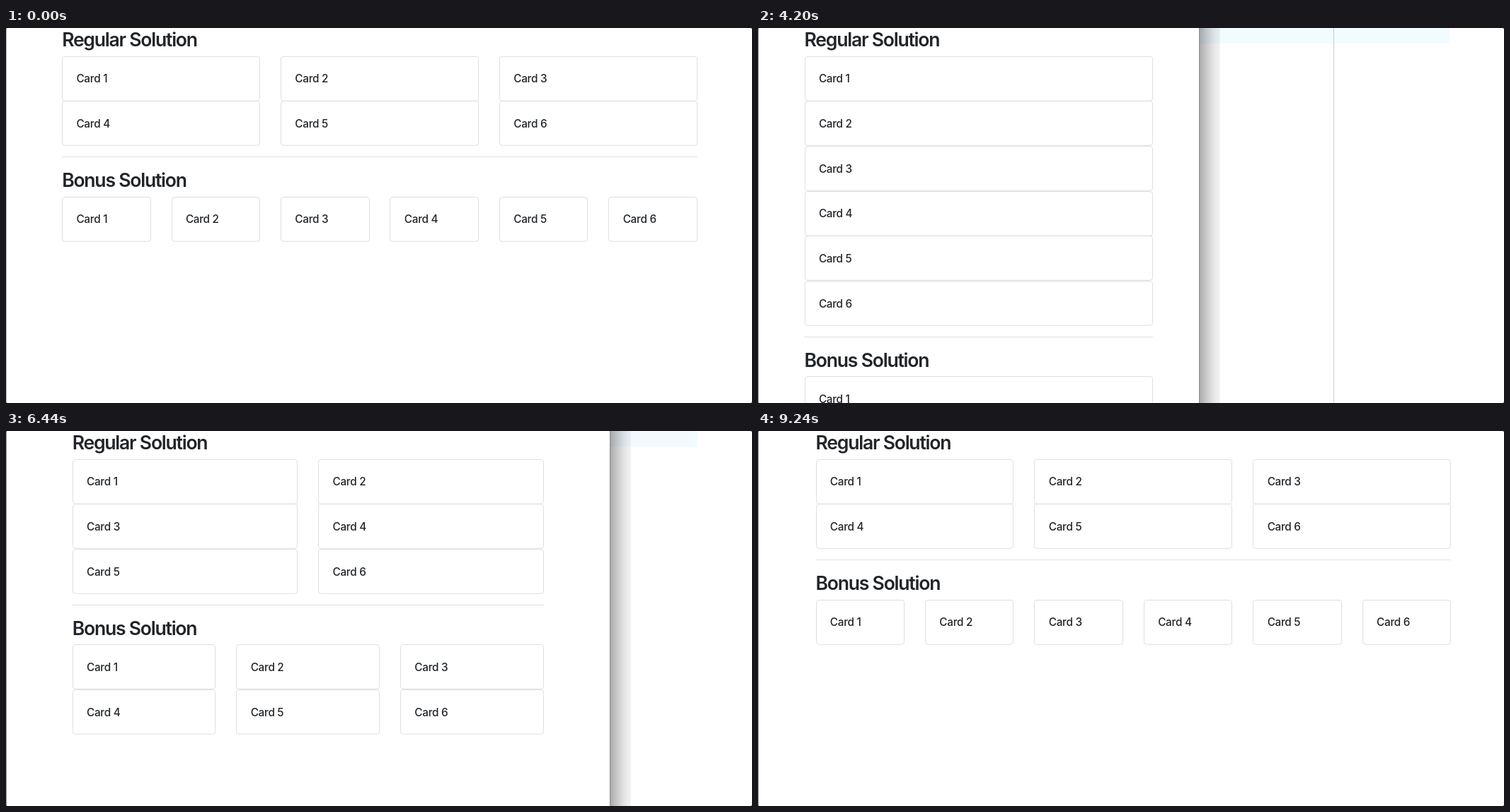
Write an HTML page that moves like this. It is 1054x531 px and loops after 9450 ms.

```html
<!DOCTYPE html>
<html lang="en">
<head>
<meta charset="utf-8">
<title>Responsive cards</title>
<style>
html, body { margin: 0; width: 100%; height: 100%; overflow: hidden; background: #fff; }
svg { display: block; width: 1054px; height: 531px; font-family: Inter, sans-serif; fill: #212529; }
.head { font-size: 26.6px; font-weight: 600; letter-spacing: -1.25px; }
.label { font-size: 15.3px; font-weight: 500; letter-spacing: -0.27px; }
.card { fill: #fff; stroke: #dfdfdf; }
</style>
</head>
<body>
<svg viewBox="0 0 1054 531">
  <defs>
    <linearGradient id="fade">
      <stop offset="0" stop-opacity=".34"/>
      <stop offset=".35" stop-opacity=".21"/>
      <stop offset=".7" stop-opacity=".1"/>
      <stop offset="1" stop-opacity=".045"/>
    </linearGradient>
  </defs>
  <rect width="1054" height="531" fill="#fff"/>
  <rect width="977" height="22" fill="#f2fbff"/>
  <rect x="813" width="1" height="531" fill="#cdcdcd"/>
  <g id="win">
    <rect width="30" height="531" fill="url(#fade)"/>
    <rect x="-1100" width="1100" height="531" fill="#fff"/>
    <rect width="1" height="531" fill="#8c8c8c"/>
  </g>
  <g id="page"></g>
  <rect id="edge" width="1" height="531"/>
  <path d="M0 0h1v1h-1zM1053 0h1v1h-1zM0 530h1v1h-1zM1053 530h1v1h-1z" fill="#444"/>
</svg>
<script>
const LOOP = 9450, STEP = 70;
const SCALE = 0.9653;             // zoom of the page on the stage
const GUTTER = 30 * SCALE, ROW = 66 * SCALE, TOP = 39.6;

// the window edge rests at its last width between drags
const START_WIDTH = 1056;
const drags = [
  { from: 1610, to: 1680, width: 1011 },
  { from: 1680, to: 2240, width: 998.5 },
  { from: 2240, to: 4200, width: 623.5 },
  { from: 4200, to: 4480, width: 545 },
  { from: 4760, to: 5740, width: 693.5 },
  { from: 5810, to: 6020, width: 838 },
  { from: 6370, to: 6930, width: 961.5 },
  { from: 6930, to: 7700, width: 1028.5 },
  { from: 7700, to: 8540, width: 1060.8 }
];

const layouts = [
  { min: 992, container: 960, regular: 3, bonus: 6 },
  { min: 768, container: 720, regular: 2, bonus: 3 },
  { min: 576, container: 540, regular: 1, bonus: 1 },
  { min: 0, regular: 1, bonus: 1 }
];

const page = document.getElementById('page');
const win = document.getElementById('win');
const edge = document.getElementById('edge');

function set(el, attrs) {
  for (const k in attrs) el.setAttribute(k, attrs[k]);
}

function add(tag, attrs, text = '') {
  const el = document.createElementNS('http://www.w3.org/2000/svg', tag);
  set(el, attrs);
  el.textContent = text;
  return page.appendChild(el);
}

function makeSection(title) {
  const head = add('text', { class: 'head' }, title);
  const cards = Array.from({ length: 6 }, (_, i) => ({
    box: add('rect', { class: 'card', rx: 3.5, height: 62.7 }),
    label: add('text', { class: 'label' }, 'Card ' + (i + 1))
  }));
  return { head, cards };
}

const regular = makeSection('Regular Solution');
const bonus = makeSection('Bonus Solution');
const rule = add('rect', { height: 1, fill: '#e1e1e1' });

function widthAt(t) {
  return drags.reduce((w, d) => {
    const p = Math.min(1, Math.max(0, (t - d.from) / (d.to - d.from)));
    return w + (d.width - w) * p;
  }, START_WIDTH);
}

function placeSection({ head, cards }, left, inner, cols, dy) {
  const pitch = (inner + GUTTER) / cols;
  set(head, { x: left, y: 26 + dy });
  cards.forEach(({ box, label }, i) => {
    const x = left + (i % cols) * pitch;
    const y = TOP + dy + Math.floor(i / cols) * ROW;
    const x0 = Math.round(x), x1 = Math.round(x + pitch - GUTTER);
    set(box, { x: x0 + 0.5, y: Math.round(y) + 0.5, width: x1 - x0 - 1 });
    set(label, { x: x + 20.3, y: y + 37.7 });
  });
}

function draw(ms) {
  const t = Math.floor(ms % LOOP / STEP) * STEP;
  const w = widthAt(t);
  const layout = layouts.find(l => w >= l.min * SCALE);
  const inner = (layout.container * SCALE || w) - GUTTER;
  const left = (w - inner) / 2;
  const stack = 6 / layout.regular * ROW;

  set(win, { transform: `translate(${Math.floor(w)})` });
  set(edge, { fill: t < drags[0].to ? '#b0b0b0' : '#8f8f8f' });
  placeSection(regular, left, inner, layout.regular, 0);
  placeSection(bonus, left, inner, layout.bonus, stack + 71.5);
  set(rule, { x: left, y: Math.floor(TOP + stack + 15.5), width: inner });
}

const start = performance.now();
function tick() {
  draw(performance.now() - start);
  requestAnimationFrame(tick);
}
tick();
</script>
</body>
</html>
```
